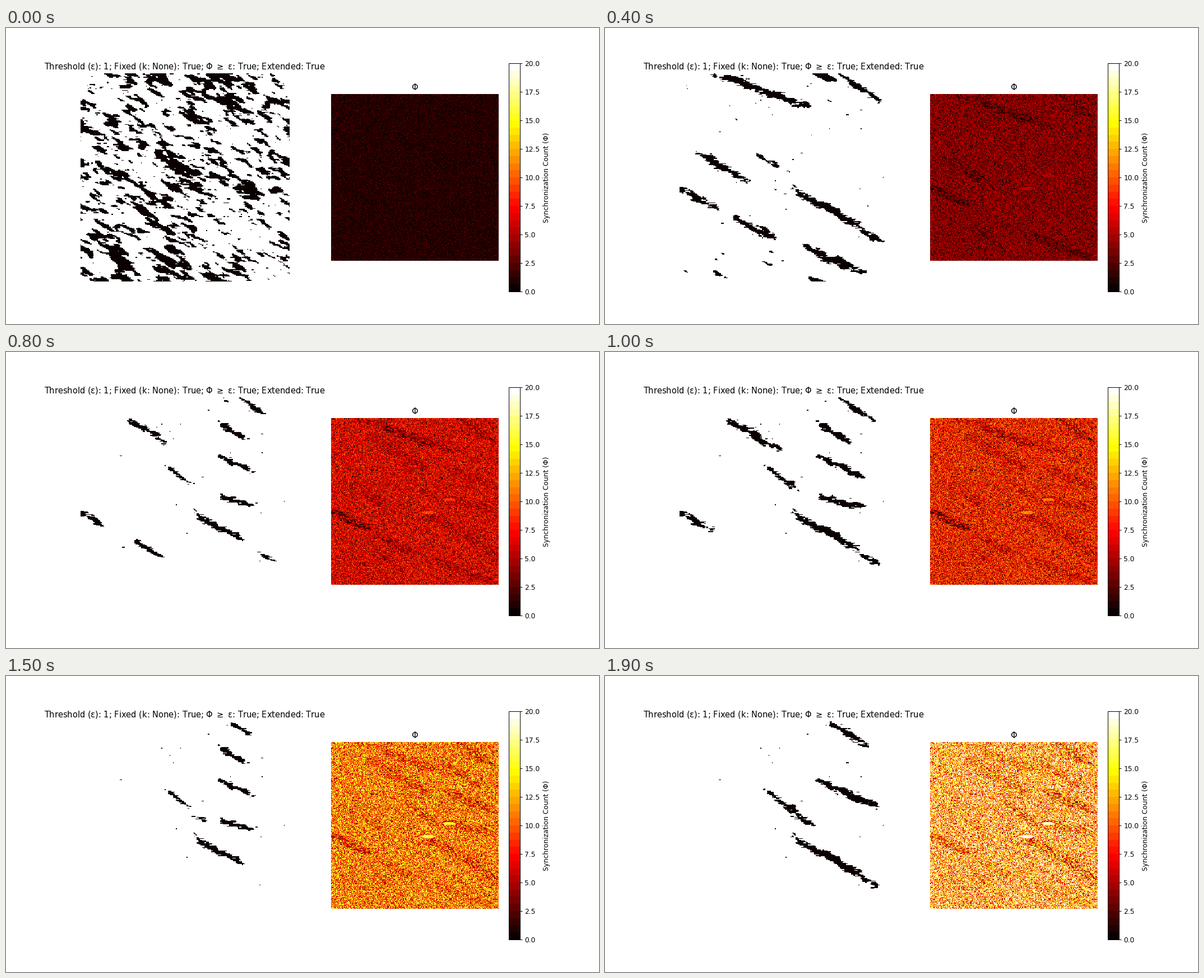
A matplotlib script that plays this animation: 1058x529 px, repeating every 2000 ms.

```python
import numpy as np
import matplotlib.pyplot as plt
from matplotlib.animation import FuncAnimation

plt.rcParams["font.family"] = "DejaVu Sans"

N = 256
FRAMES = 20
CYCLE = 7
LEFT, TOP, SIDE = 132.5, 80.8, 372.7
SLANT = np.radians(26)
rng = np.random.default_rng(11)

# Avalanche sources: x, y, reach, slope, first and last frame.
SOURCES = [
    (334, 284, 166, 0.61, 4, 19),
    (382, 260, 115, 0.22, 5, 16),
    (380, 189, 115, 0.44, 6, 19),
    (286, 208, 80, 0.68, 6, 19),
    (396, 84, 78, 0.56, 12, 19),
    (420, 85, 85, 0.62, 2, 11),
    (382, 128, 83, 0.68, 8, 16),
    (218, 124, 132, 0.55, 5, 13),
    (447, 358, 60, 0.50, 4, 13),
    (230, 340, 90, 0.48, 4, 8),
    (132, 289, 85, 0.50, 1, 10),
    (195, 84, 210, 0.34, 1, 7),
    (165, 218, 110, 0.66, 1, 4),
    (355, 393, 135, 0.42, 1, 4),
    (218, 370, 85, 0.72, 1, 3),
    (337, 250, 40, 0.42, 14, 19),
]


def smooth(along, across, angle=0.0):
    """Unit-variance noise stretched along a slanted direction."""
    k = 2 * np.pi * np.fft.fftfreq(N)
    kx, ky = k[None, :], k[:, None]
    c, s = np.cos(angle), np.sin(angle)
    damp = np.exp(-0.5 * ((along * (c * kx + s * ky)) ** 2
                          + (across * (c * ky - s * kx)) ** 2))
    noise = np.fft.ifft2(np.fft.fft2(rng.normal(size=(N, N))) * damp).real
    return noise / noise.std()


cell = (np.arange(N) + 0.5) * SIDE / N
X = (LEFT + cell)[None, :] + rng.normal(0, 1.6, (N, 1))
Y = (TOP + cell)[:, None] + 1.8 * smooth(9, 9)
rough = 0.75 * smooth(2.2, 1.0, SLANT) + 0.65 * smooth(2.5, 0.3)
veins = np.abs(smooth(3, 1.3, SLANT) + 0.3 * smooth(2, 0.4)) < 0.36


def alive(source, n):
    return source[4] <= n <= source[5]


def avalanche(source, extent=1.0, spread=1.0):
    """Tapered ragged streak running down from its source."""
    x, y, reach, slope = source[:4]
    dx = reach * extent
    dy = dx * slope
    width = spread * min(2.5 + 0.05 * dx, 8)
    t = np.clip(((X - x) * dx + (Y - y) * dy) / (dx * dx + dy * dy), 0, 1)
    radius = 0.85 * width * (0.4 + 0.6 * np.sin(np.pi * t))
    depth = radius - np.hypot(X - x - t * dx, Y - y - t * dy)
    return depth > min(0.35 * width, 2.2) * rough


def left_frames():
    coarse = smooth(13, 3.5, SLANT)
    fine = (smooth(4.5, 1.5, SLANT) + 0.6 * smooth(10, 5, SLANT)
            + 0.4 * smooth(1.8, 0.8, SLANT) + 0.3 * smooth(4, 0.4))
    specks = rng.integers(0, [int(0.8 * N), N - 6, 4], (100, 3))
    frames = []
    for n in range(FRAMES):
        # The background thins out and keeps only its largest clusters.
        texture = fine + (0.3 + 0.6 * min(n, 3)) * coarse
        mask = texture > np.quantile(texture, 1 - 0.28 * 0.42 ** n)
        # Every streak grows until the common cycle clears it.
        extent = 0.4 + 0.6 * (n % CYCLE) / (CYCLE - 1)
        for source in SOURCES:
            if alive(source, n):
                mask |= avalanche(source, extent)
        for row, col, size in specks[:12 + 80 // (n + 1)]:
            mask[row, col:col + max(size, 1)] = True
        frames.append(mask)
    return frames


def right_frames():
    chance = 1 - 0.75 * rng.random((N, N)) ** 1.2
    count = (rng.random((N, N)) < 0.35).astype(float)
    scars = [avalanche(s, spread=1.5) for s in SOURCES]
    glow = np.zeros((N, N), bool)
    for s in SOURCES[:2]:
        glow |= np.hypot((X - s[0] - 14) / 14, (Y - s[1] - 4) / 4) < 1
    frames = []
    for n in range(FRAMES):
        p = chance.copy()
        for source, scar in zip(SOURCES, scars):
            if alive(source, n):
                p[scar] = 0.88 * chance[scar]
        for source, scar in zip(SOURCES, scars):
            if alive(source, n):
                p[scar & veins] = 0.2 * chance[scar & veins]
        p[glow] = 0.95
        count = count + (rng.random((N, N)) < p)
        frames.append(count)
    return frames


cells = left_frames()
counts = right_frames()

fig, (ax_cells, ax_phi) = plt.subplots(
    1, 2, figsize=(12, 6), dpi=88.1667,
    gridspec_kw={"left": 0.12525, "right": 0.90025})
hot = plt.get_cmap("hot", 32)
cell_image = ax_cells.imshow(~cells[0], cmap=hot, vmin=0, vmax=1, interpolation="nearest")
phi_image = ax_phi.imshow(counts[0], cmap=hot, vmin=0, vmax=20, interpolation="nearest")
ax_cells.set_title(r"Threshold (ε): 1; Fixed (k: None): True; Φ $\geq$ ε: True; Extended: True",
                   fontsize=11.92)
ax_phi.set_title("Φ")
for ax in (ax_cells, ax_phi):
    ax.axis("off")
fig.colorbar(phi_image, ax=ax_phi, label="Synchronization Count (Φ)")


def update(n):
    cell_image.set_data(~cells[n])
    phi_image.set_data(counts[n])
    return cell_image, phi_image


anim = FuncAnimation(fig, update, frames=FRAMES, interval=100, repeat=True, repeat_delay=0)
plt.show()
```
